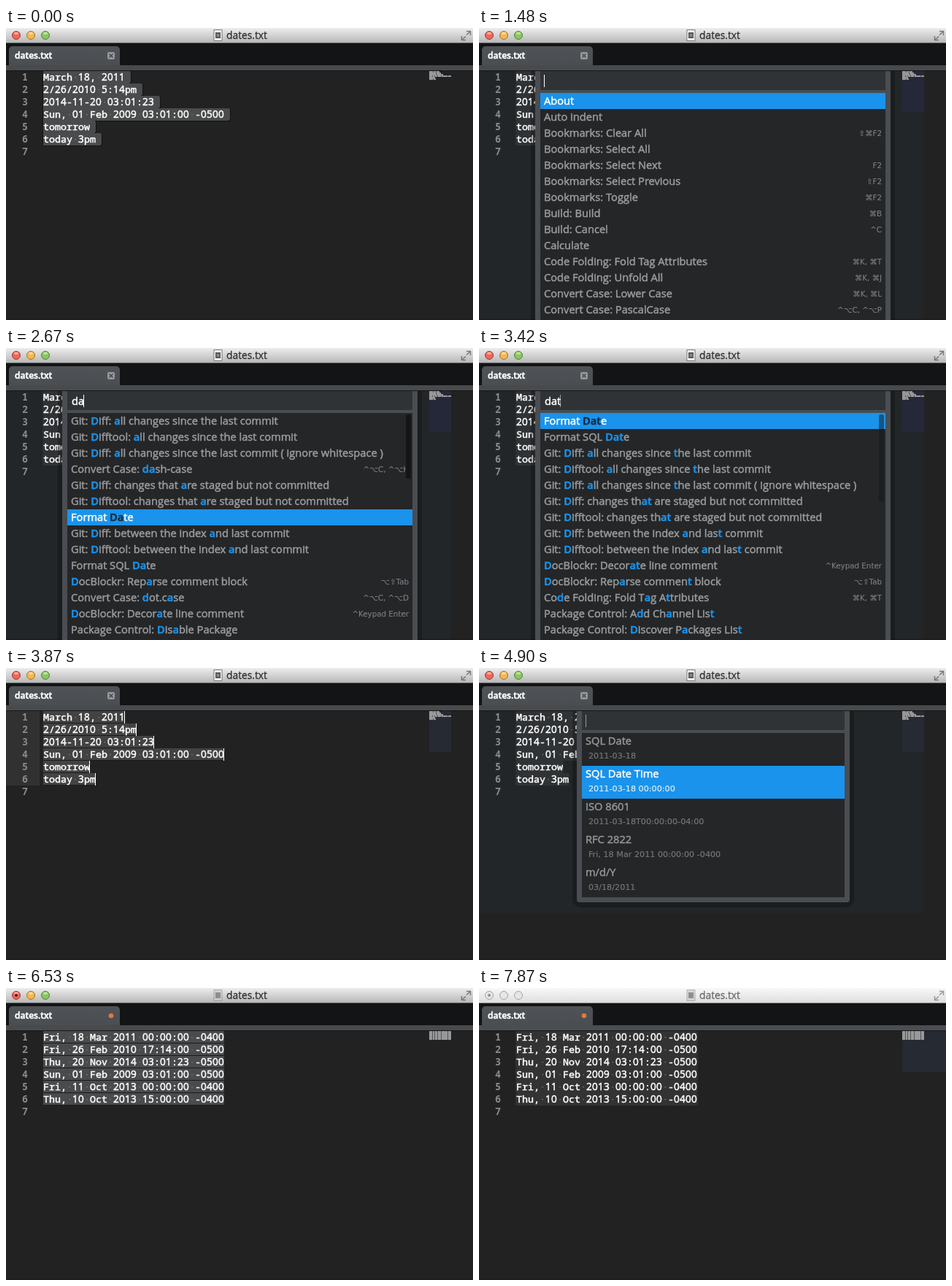
Animation of 640x400 px, one loop 8 s. Source, as an HTML page with a canvas:

```html
<!DOCTYPE html>
<html lang="en">
<head>
<meta charset="utf-8">
<title>Format Date</title>
<style>
html, body { margin: 0; width: 100%; height: 100%; overflow: hidden; background: #222; }
canvas { display: block; }
</style>
</head>
<body>
<canvas id="stage" width="640" height="400"></canvas>
<script>
const ctx = document.getElementById('stage').getContext('2d');
const LOOP = 8000, ROW = 17, TOP = 59, LEFT = 51, CHAR = 8;
const MONO = '500 13.33px "Noto Sans Mono", "DejaVu Sans Mono", monospace';
const MONO_BOLD = 'bold 13.33px "Noto Sans Mono", "DejaVu Sans Mono", monospace';
const UI = '"Open Sans", "DejaVu Sans", sans-serif';
const DIGITS = '500 13.6px ' + UI; // plain zero, unlike the mono face
const SMALL = '"DejaVu Sans", sans-serif';
const BLUE = '#1a93ec', EDGE = '#4a4d51';

const before = ['March 18, 2011', '2/26/2010 5:14pm', '2014-11-20 03:01:23',
  'Sun, 01 Feb 2009 03:01:00 -0500', 'tomorrow', 'today 3pm'];
const after = ['Fri, 18 Mar 2011 00:00:00 -0400', 'Fri, 26 Feb 2010 17:14:00 -0500',
  'Thu, 20 Nov 2014 03:01:23 -0500', 'Sun, 01 Feb 2009 03:01:00 -0500',
  'Fri, 11 Oct 2013 00:00:00 -0400', 'Thu, 10 Oct 2013 15:00:00 -0400'];

// Palette rows: "label|shortcut", with matched letters between asterisks.
const palettes = {
  '': { selected: 0, rows: ['About', 'Auto indent', 'Bookmarks: Clear All|⇧⌘F2',
    'Bookmarks: Select All', 'Bookmarks: Select Next|F2', 'Bookmarks: Select Previous|⇧F2',
    'Bookmarks: Toggle|⌘F2', 'Build: Build|⌘B', 'Build: Cancel|^C', 'Calculate',
    'Code Folding: Fold Tag Attributes|⌘K, ⌘T', 'Code Folding: Unfold All|⌘K, ⌘J',
    'Convert Case: Lower Case|⌘K, ⌘L', 'Convert Case: PascalCase|^⌥C, ^⌥P'] },
  d: { selected: 0, thumb: 50, rows: ['Format *D*ate', 'Git: *D*iff: all changes since the last commit',
    'Git: *D*ifftool: all changes since the last commit', 'Convert Case: *d*ash-case|^⌥C, ^⌥H',
    'Convert Case: *d*ot.case|^⌥C, ^⌥D', 'Format SQL *D*ate', '*D*ocBlockr: Reparse comment block|⌥⇧Tab',
    '*D*ocBlockr: Decorate line comment|^Keypad Enter', 'Package Control: *D*isable Package',
    'Auto in*d*ent', 'Buil*d*: Build|⌘B', 'Buil*d*: Cancel|^C',
    'Co*d*e Folding: Fold Tag Attributes|⌘K, ⌘T', 'Co*d*e Folding: Unfold All|⌘K, ⌘J'] },
  da: { selected: 6, thumb: 88, rows: ['Git: *D*iff: *a*ll changes since the last commit',
    'Git: *D*ifftool: *a*ll changes since the last commit',
    'Git: *D*iff: *a*ll changes since the last commit ( ignore whitespace )',
    'Convert Case: *da*sh-case|^⌥C, ^⌥H',
    'Git: *D*iff: changes that *a*re staged but not committed',
    'Git: *D*ifftool: changes that *a*re staged but not committed', 'Format *Da*te',
    'Git: *D*iff: between the index *a*nd last commit',
    'Git: *D*ifftool: between the index *a*nd last commit', 'Format SQL *Da*te',
    '*D*ocBlockr: Rep*a*rse comment block|⌥⇧Tab', 'Convert Case: *d*ot.c*a*se|^⌥C, ^⌥D',
    '*D*ocBlockr: Decor*a*te line comment|^Keypad Enter', 'Package Control: *D*is*a*ble Package'] },
  dat: { selected: 0, thumb: 120, rows: ['Format *Dat*e', 'Format SQL *Dat*e',
    'Git: *D*iff: *a*ll changes since *t*he last commit',
    'Git: *D*ifftool: *a*ll changes since *t*he last commit',
    'Git: *D*iff: *a*ll changes since *t*he last commit ( ignore whitespace )',
    'Git: *D*iff: changes th*at* are staged but not committed',
    'Git: *D*ifftool: changes th*at* are staged but not committed',
    'Git: *D*iff: between the index *a*nd las*t* commit',
    'Git: *D*ifftool: between the index *a*nd las*t* commit',
    '*D*ocBlockr: Decor*at*e line comment|^Keypad Enter',
    '*D*ocBlockr: Rep*a*rse commen*t* block|⌥⇧Tab', 'Co*d*e Folding: Fold T*a*g A*t*tributes|⌘K, ⌘T',
    'Package Control: A*d*d Ch*a*nnel Lis*t*', 'Package Control: *D*iscover P*a*ckages Lis*t*'] }
};
const formats = [['SQL Date', '2011-03-18'], ['SQL Date Time', '2011-03-18 00:00:00'],
  ['ISO 8601', '2011-03-18T00:00:00-04:00'], ['RFC 2822', 'Fri, 18 Mar 2011 00:00:00 -0400'],
  ['m/d/Y', '03/18/2011']];

// Each track lists [time, value]; a value holds until the next one.
const caretTrack = [[0, 0], [300, .5], [450, 1], [1030, .5], [1180, 0], [1480, 1], [1920, .5],
  [2070, 0], [2370, 1], [3420, .5], [3570, 0], [3870, 1], [4310, .5], [4460, 0], [4900, .5],
  [5050, 1], [5350, .5], [5490, 0], [5940, 1], [6380, .5], [6530, 0], [6980, .5], [7130, 1],
  [7420, .5], [7570, 0]];
const modeTrack = [[0, 'block'], [590, 'split'], [1480, 'palette'], [3870, 'split'],
  [4010, 'formats'], [5940, 'done'], [7870, 'inactive']];
const queryTrack = [[0, ''], [2370, 'd'], [2670, 'da'], [2970, 'dat']];
const formatTrack = [[0, 0], [4900, 1], [5200, 2], [5490, 3]];
const scrollTrack = [[0, 1], [3420, .5], [3570, 0]];
const at = (track, t) => track.reduce((value, [start, next]) => t >= start ? next : value, track[0][1]);

function rect(x, y, w, h, color, radius = 0) {
  ctx.fillStyle = color;
  ctx.beginPath();
  ctx.roundRect(x, y, w, h, radius);
  ctx.fill();
}

function circle(x, y, r, fill, stroke) {
  ctx.beginPath();
  ctx.arc(x, y, r, 0, 7);
  ctx.fillStyle = fill;
  ctx.fill();
  if (stroke) { ctx.strokeStyle = stroke; ctx.lineWidth = 1; ctx.stroke(); }
}

// A thin outline thickens the stems without changing the spacing.
function text(string, x, y, font, color, { align = 'left', stem = .5 } = {}) {
  ctx.font = font;
  ctx.fillStyle = ctx.strokeStyle = color;
  ctx.textAlign = align;
  ctx.fillText(string, x, y);
  if (!stem) return;
  ctx.lineWidth = stem;
  ctx.strokeText(string, x, y);
}

function line(points, color, width = 1) {
  ctx.strokeStyle = color;
  ctx.lineWidth = width;
  ctx.beginPath();
  points.forEach(([x, y], i) => i ? ctx.lineTo(x, y) : ctx.moveTo(x, y));
  ctx.stroke();
}

function vertical(y0, y1, from, to) {
  const g = ctx.createLinearGradient(0, y0, 0, y1);
  g.addColorStop(0, from);
  g.addColorStop(1, to);
  return g;
}

function faded(alpha, draw) {
  ctx.globalAlpha = alpha;
  draw();
  ctx.globalAlpha = 1;
}

function titleBar(active, dirty) {
  rect(0, 0, 640, 20, active ? vertical(0, 20, '#ededed', '#b8b8b8') : vertical(0, 20, '#f8f8f8', '#dedede'));
  rect(0, 20, 640, 1, active ? '#5c5c5c' : '#8c8c8c');
  const lights = [['#f0655a', '#9c3a34'], ['#f3b750', '#a2742c'], ['#8cc660', '#4f8538']];
  lights.forEach(([fill, edge], i) => {
    const x = 14 + 20 * i;
    circle(x, 10, 5.5, active ? fill : '#e6e6e6', active ? edge : '#a4a4a4');
    if (active) faded(.45, () => { ctx.beginPath(); ctx.ellipse(x, 7.2, 3, 1.8, 0, 0, 7); ctx.fillStyle = '#fff'; ctx.fill(); });
  });
  if (dirty) circle(14, 10, 2, active ? '#5c1511' : '#929292');

  faded(dirty ? .5 : 1, () => {
    rect(284.5, 2, 12, 16, '#777', 1);
    rect(285.5, 3, 10, 14, '#f6f6f6');
    rect(287, 6, 7, 8, '#555');
    rect(288.5, 8, 4, 4, '#888');
  });
  text('dates.txt', 302, 15, '13.8px ' + UI, active ? '#303030' : '#6c6c6c', { stem: .3 });

  const arrow = active ? '#777' : '#999';
  line([[631, 4.5], [636.5, 4.5], [636.5, 10]], arrow, 1.5);
  line([[636, 5], [631, 9.5]], arrow, 1.5);
  line([[624.5, 11], [624.5, 16.5], [630, 16.5]], arrow, 1.5);
  line([[625, 16], [630, 11.5]], arrow, 1.5);
}

function tabBar(active, dirty) {
  rect(0, 21, 640, 30, '#121416');
  rect(4, 25, 152, 27, vertical(25, 51, '#505356', EDGE), [5, 5, 0, 0]);
  rect(0, 51, 640, 7, active ? '#484a4c' : EDGE);
  rect(0, 58, 640, 1, '#151617');
  text('dates.txt', 12, 42, '600 12px ' + UI, '#fff');
  if (dirty) return circle(144, 38, 3.3, '#dc7a40');
  rect(139, 33, 10, 10, '#96989a', 2);
  line([[141.5, 35.5], [146.5, 40.5]], '#45484a', 1.5);
  line([[146.5, 35.5], [141.5, 40.5]], '#45484a', 1.5);
}

function editor(lines, mode, caret, viewport) {
  const panel = mode === 'palette' || mode === 'formats';
  const focused = mode === 'split' || mode === 'done';
  rect(0, 59, 640, 341, '#222');
  if (panel) rect(0, 59, 610, mode === 'formats' ? 277 : 341, '#232628');
  rect(0, 398, 640, 2, '#1e1e1e');
  if (mode === 'split') rect(0, TOP, 46, 6 * ROW, '#313131');

  const width = s => s.length * CHAR;
  const rowY = i => TOP + ROW * i;
  if (mode === 'block') {
    lines.forEach((s, i) => rect(LEFT - 1, rowY(i), width(s) + CHAR + 2, ROW + 1, '#121212', [0, 3, 3, 0]));
    lines.forEach((s, i) => rect(LEFT, rowY(i), width(s) + CHAR, ROW, '#494b4c', [0, 2, 3, 0]));
  } else lines.forEach((s, i) => {
    if (focused) {
      rect(LEFT, rowY(i), width(s), ROW, '#1a1a1a');
      rect(LEFT, rowY(i), width(s), ROW - 1, mode === 'done' ? '#494b4c' : '#434343');
    } else rect(LEFT - 1, rowY(i), width(s) + 2, ROW, panel ? '#303335' : '#333', 3);
  });

  for (let i = 0; i < 7; i++) text(i + 1, 30, rowY(i) + 13, MONO_BOLD, '#8a8a8a', { align: 'right', stem: 0 });
  lines.forEach((s, i) => {
    [...s].forEach((c, k) => {
      const x = LEFT + k * CHAR;
      if (c === ' ') rect(x + 3.5, rowY(i) + 8, 1.3, 1.3, '#858585');
      else text(c, x + CHAR / 2, rowY(i) + 13, /\d/.test(c) ? DIGITS : MONO, '#fff', { align: 'center' });
    });
    if (focused) faded(caret, () => rect(LEFT + width(s) - 1, rowY(i), 1, ROW, '#fff'));
  });
  if (mode === 'block') faded(caret, () => rect(LEFT, rowY(6), 1, ROW, '#fff'));

  if (viewport) rect(580, 59, mode === 'inactive' ? 60 : 30, 56, mode === 'palette' ? '#252838' : '#252a33');
  lines.forEach((s, i) => [...s.slice(0, 30)].forEach((c, k) =>
    rect(580 + k, 59 + 2 * i, 1, 2, c === ' ' ? '#55575a' : '#96989a')));
}

// Frame, input line and caret shared by both panels.
function panelFrame(x, width, bottom, query, caret) {
  rect(x - 13, 59, width + 26, bottom - 45, 'rgba(0, 0, 0, .25)', [0, 0, 12, 12]);
  rect(x - 7, 59, width + 14, bottom - 52, EDGE, [0, 0, 4, 4]);
  rect(x, 59, width, 26, '#303336');
  rect(x, 89, width, bottom - 89, '#242628');
  text(query, x + 6, 78, '500 14.65px ' + UI, '#fff');
  const caretX = x + 5 + Math.round(ctx.measureText(query).width);
  faded(caret, () => rect(caretX, 64, 1, 17, '#fff'));
}

function palette(query, caret, scroll) {
  const { rows, selected, thumb } = palettes[query];
  panelFrame(84, 473, 420, query, caret);
  rows.forEach((row, i) => {
    const y = 89 + 22 * i, on = i === selected;
    const [label, keys] = row.split('|');
    if (on) rect(84, y, 473, 22, BLUE);
    let x = 89;
    label.split('*').forEach((part, k) => {
      const match = k % 2;
      const color = on ? (match ? '#17293a' : '#fff') : (match ? BLUE : '#9a9c9e');
      text(part, x, y + 16, `${match ? 600 : 500} 14.65px ${UI}`, color);
      x += ctx.measureText(part).width;
    });
    if (keys) text(keys, 552, y + 15, '10.3px ' + SMALL, '#7c7e80', { align: 'right', stem: .15 });
  });
  if (thumb) faded(scroll, () => rect(548, 91, 7, thumb, '#141516', 3));
}

function formatPanel(selected, caret) {
  panelFrame(141, 360, 314, '', caret);
  formats.forEach(([name, sample], i) => {
    const y = 89 + 45 * i, on = i === selected;
    if (on) rect(141, y, 360, 45, BLUE);
    text(name, 146, y + 16, '500 14.65px ' + UI, on ? '#fff' : '#949698');
    text(sample, 150, y + 35, '11.2px ' + SMALL, on ? '#e4f1fc' : '#77797b', { stem: .15 });
  });
}

function draw(now) {
  const t = now % LOOP;
  const mode = at(modeTrack, t), caret = at(caretTrack, t);
  const active = mode !== 'inactive', dirty = t >= 6090;
  const viewport = !active || (t >= 590 && t < 6090);
  editor(t < 5940 ? before : after, mode, caret, viewport);
  titleBar(active, dirty);
  tabBar(active, dirty);
  if (mode === 'palette') palette(at(queryTrack, t), caret, at(scrollTrack, t));
  if (mode === 'formats') formatPanel(at(formatTrack, t), caret);
  requestAnimationFrame(draw);
}
ctx.lineJoin = 'round';
requestAnimationFrame(draw);
</script>
</body>
</html>
```
